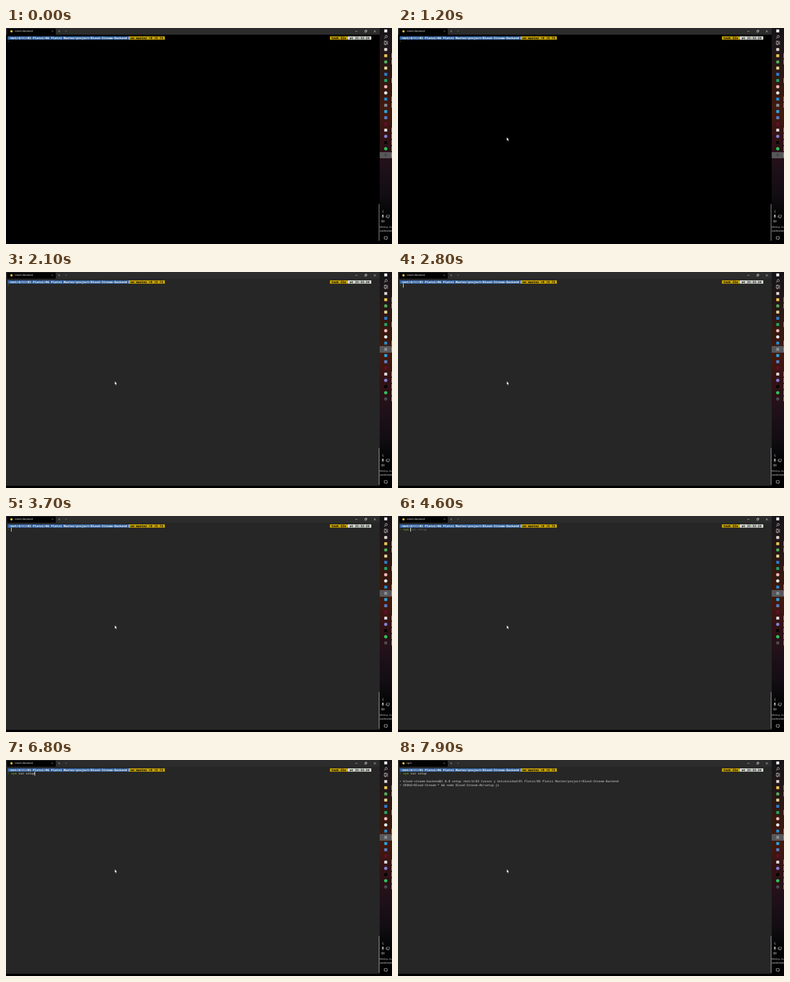
Write an HTML page that moves like this. It is 690 px wide and 388 px high and loops after 8000 ms.

```html
<!DOCTYPE html>
<html lang="es">
<head>
<meta charset="utf-8">
<title>Terminal</title>
<style>
  html, body { margin: 0; width: 100%; height: 100%; overflow: hidden; background: #000; }
  #stage {
    position: relative; width: 690px; height: 388px; overflow: hidden; background: #000;
    text-rendering: geometricPrecision; --loop: 8s step-end infinite;
  }
  #stage > * { position: absolute; }
  svg { left: 0; top: 0; }

  /* window */
  .term { left: 0; top: 11.5px; width: 668px; height: 372.5px; animation: focus var(--loop); }
  .bar { left: 0; top: 0; width: 668px; height: 11.5px; background: #2c2c2d; }
  .tab { left: 2px; top: 0.5px; width: 87px; height: 11px; background: #020202; }
  .title {
    left: 15px; top: 2px; color: #eee; white-space: pre;
    font: 4.5px/8px "Open Sans", "Noto Sans", sans-serif;
  }
  .shell { animation: before var(--loop); }
  .npm { animation: after var(--loop); }

  /* terminal rows */
  .row {
    --n: 0; left: 2.8px; top: calc(14.6px + var(--n) * 6.8px); height: 6.8px; color: #d3d7cf;
    font: 5.4px/6.8px "Noto Sans Mono", "DejaVu Sans Mono", monospace;
    font-variant-ligatures: none; white-space: pre;
  }
  .row span { display: inline-block; height: 6.8px; vertical-align: top; }
  .prompt { font-weight: 700; color: #000; }
  .path { background: #3465a4; color: #eeeeec; box-shadow: inset -0.8px 0 #b9cbe3; }
  .path i { font-style: normal; color: #a4b9d8; }
  .git { background: #c4a000; }
  .clock { background: #d3d7cf; }
  .go { color: #4e9a06; }
  .line { left: 9.28px; }
  .ghost { color: #63656a; animation: ghost var(--loop); }
  .typed {
    overflow: hidden; width: 0; background: #262626; border-right: 0.8px solid transparent;
    animation: type 8s infinite, blink var(--loop), focus var(--loop);
  }
  .typed b { font-weight: 400; color: #73b52b; }
  .out { animation: out var(--loop); }

  /* taskbar */
  .dock {
    left: 668px; top: 0; width: 22px; height: 388px;
    background: linear-gradient(#161418, #211719 12%, #35190f 27%, #43190f 40%,
      #321216 51%, #201019 64%, #120d13 77%, #050506 86%, #000);
  }
  .active { left: 668px; top: 222.6px; width: 22px; height: 11.2px; background: #58575a; animation: active var(--loop); }
  .when {
    left: 668px; width: 22px; top: 355.4px; color: #f2f2f2; text-align: center; white-space: pre;
    font: 4.3px/6.6px "Open Sans", "Noto Sans", sans-serif;
  }
  .mouse { animation: glide 8s infinite; }

  @keyframes focus { 0% { background: #000; } 15.9%, 100% { background: #262626; } }
  @keyframes active { 0% { top: 222.6px; } 15.9%, 100% { top: 133.4px; } }
  @keyframes before { 0% { opacity: 1; } 89%, 100% { opacity: 0; } }
  @keyframes after { 0% { opacity: 0; } 89%, 100% { opacity: 1; } }
  @keyframes out { 0% { opacity: 0; } 95%, 100% { opacity: 1; } }
  @keyframes ghost { 0% { opacity: 0; } 52%, 100% { opacity: 1; } }
  @keyframes type {
    0%, 51% { width: 0; animation-timing-function: steps(4); }
    55.5% { width: 4ch; animation-timing-function: step-end; }
    60% { width: 4ch; animation-timing-function: steps(9); }
    82%, 100% { width: 13ch; }
  }
  @keyframes blink {
    0%, 22.9%, 36.1%, 49.4%, 88%, 100% { border-color: transparent; }
    15.9%, 29.5%, 42.75%, 51% { border-color: #eee; }
  }
  @keyframes glide {
    0%, 10% { transform: translate(-205px, 30px); animation-timing-function: ease-out; }
    13.75%, 100% { transform: none; }
  }
</style>
</head>
<body>
<div id="stage">
  <div class="term"></div>
  <div class="bar"></div>
  <div class="tab"></div>
  <div class="title shell">.tream-Backend</div>
  <div class="title npm">npm</div>

  <div class="row prompt"><span class="path"> /mnt/d/<i>03</i>/01 Platzi/06 Platzi Master/project/Blood-Stream-Backend </span><span class="git"> on master &gt;9 !5 ?1 </span></div>
  <div class="row prompt" style="left:578.6px"><span class="git"> took 22s </span><span class="clock"> at 21:32:24 </span></div>
  <div class="row go" style="--n:1">&gt;</div>
  <div class="row line ghost" style="--n:1">npm run setup</div>
  <div class="row line" style="--n:1"><span class="typed"><b>npm</b> run setup</span></div>
  <div class="row out" style="--n:3">&gt; blood-stream-backend@1.0.0 setup /mnt/d/03 Cursos y Universidad/01 Platzi/06 Platzi Master/project/Blood-Stream-Backend
&gt; DEBUG=Blood-Stream:* &amp;&amp; node Blood-Stream-db/setup.js</div>

  <div class="dock"></div>
  <div class="active"></div>
  <div class="when">09:32 p. m.
24/09/2020</div>

  <svg width="690" height="388" fill="none" stroke="#e6e6e6" stroke-width=".7">
    <circle cx="9.8" cy="6" r="2.1" fill="#edc33c" stroke="none"/>
    <!-- tab and window buttons -->
    <path stroke="#aaa" stroke-width=".5" d="M81.4 4.5l2.6 2.6m0-2.6l-2.6 2.6M93 5.9h4m-2-2v4M105.6 5.2l1.5 1.4 1.5-1.4"/>
    <path stroke-width=".6" d="M624.4 6h3.8M641.3 4.9h2.7v2.7h-2.7zM642.3 4.9v-1h2.7v2.7h-1M657.5 4.2l3.6 3.6m0-3.6l-3.6 3.6"/>
    <path stroke="#a0a0a0" stroke-width="1" d="M666.9 316v66"/>
    <!-- search and task view -->
    <circle cx="679.6" cy="15.3" r="2"/>
    <path d="M678.1 16.8l-2.2 2.2M676.2 24.8h4v3.8h-4zM676.2 23.4h4M676.2 30h4M682 23.3v7"/>
    <g id="apps" stroke="none"></g>
    <!-- tray -->
    <path d="M674.8 327.4l-1.9 2.2 1.9 2.2"/>
    <rect x="672.6" y="335.3" width="2" height="4" rx="1" fill="#e6e6e6" stroke="none"/>
    <path stroke-width=".5" d="M671.8 338.4q0 2 1.8 2t1.8-2M673.6 340.4v1.3M680.5 336.2h5v3.5h-5zM683 339.7v1.5M681.5 341.2h3M679.5 337v4"/>
    <path stroke-width=".5" d="M671 346.2h1l1.4-1.3v4.4l-1.4-1.3h-1zM674.6 345.9q.8 1.2 0 2.4M675.7 345q1.5 2.1 0 4.2"/>
    <path d="M676.2 374.8h5.2v4.3h-1.5v1.2l-1.4-1.2h-2.3z"/>
  </svg>

  <svg class="mouse" width="690" height="388">
    <path d="M194.4 196.3v6.1l1.4-1.2 1 2.2 1-.5-1-2.1h1.8z" fill="#fff" stroke="#111" stroke-width=".3"/>
  </svg>
</div>

<script>
  // Taskbar entries from top to bottom: shape, colour, and "!" for a running app.
  const apps = `square #f2f2f2|||square #ddd2ce|square #edc552 !|circle #50aa58 !|square #e5d99c
    |square #2b7cd3|square #21a366 !|circle #eeb7b5|circle #dce6e9|square #268ad2 !|square #879095 !
    |square #29a5df|square #5a82cc|square #610f27|square #dcdcdc !|circle #8580d6 !
    |square #040404 !|circle #30c35b !|circle #4a494c !`.split("|");

  const layer = document.getElementById("apps");
  function add(tag, attrs) {
    const el = document.createElementNS("http://www.w3.org/2000/svg", tag);
    for (const key in attrs) el.setAttribute(key, attrs[key]);
    layer.append(el);
  }

  apps.forEach((app, i) => {
    const [shape, fill, running] = app.trim().split(" ");
    const y = 5.2 + i * 11.14;
    if (shape === "circle") add("circle", { cx: 678.8, cy: y, r: 2.9, fill });
    if (shape === "square") add("rect", { x: 676.2, y: y - 2.6, width: 5.2, height: 5.2, fill });
    if (running) add("rect", { x: 689.1, y: y - 4.5, width: 0.9, height: 9, fill: "#7eb8a2" });
  });
</script>
</body>
</html>
```
